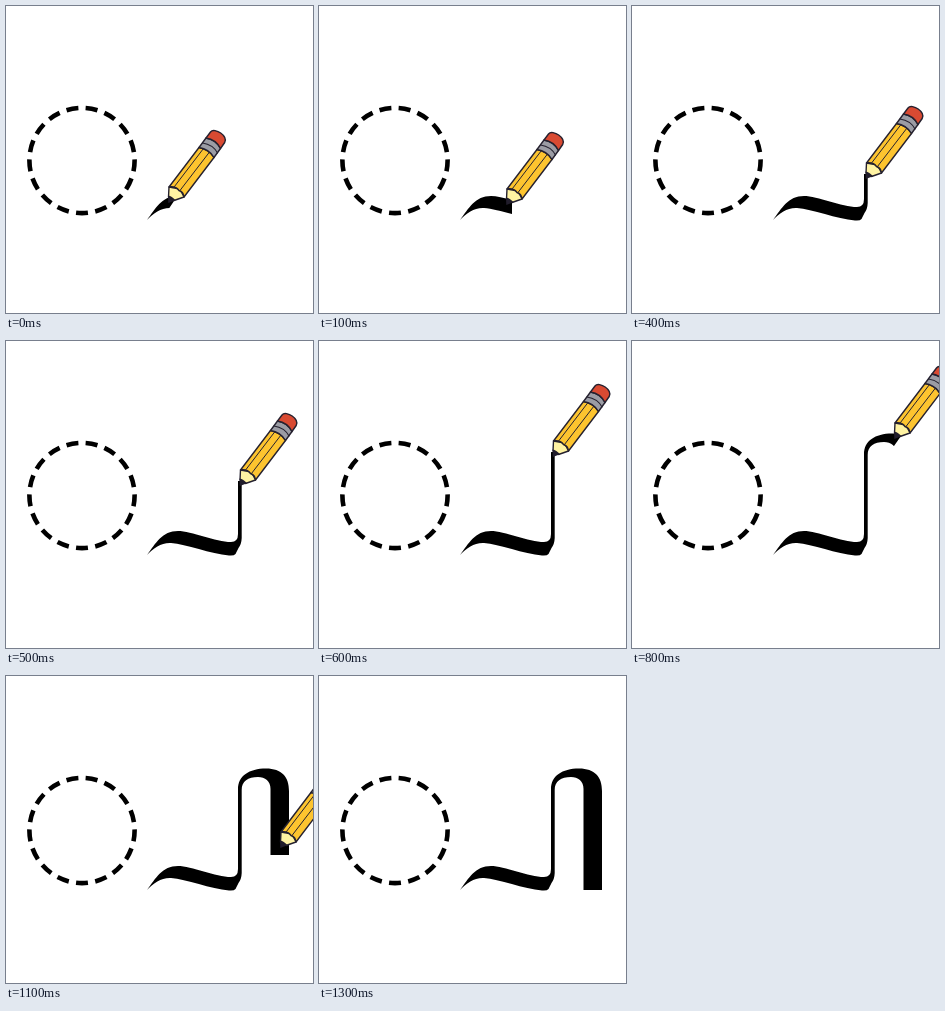
Animation, 307 px wide and 307 px high, one loop 3300 ms. Source, as an HTML page:

```html
<!DOCTYPE html>
<html lang="en">
<head>
<meta charset="utf-8">
<title>Writing a letter</title>
<style>
  html, body { margin: 0; width: 100%; height: 100%; overflow: hidden; background: #fff; }
  svg { display: block; width: 100vw; height: 100vh; }
  .pencil { stroke: #25212f; stroke-width: 1.4; stroke-linejoin: round; stroke-linecap: round; }
</style>
</head>
<body>
<svg viewBox="0 0 307 307">
  <clipPath id="drawn"><path id="reveal"/></clipPath>

  <circle cx="76" cy="154.5" r="52.6" fill="none" stroke="#000" stroke-width="4.6"
    pathLength="17" stroke-dasharray=".62 .38" stroke-dashoffset="-.19" transform="rotate(-90 76 154.5)"/>

  <path clip-path="url(#drawn)" d="M141 214C150 202 156 190 172 190C185 190 210 201 225 201Q232 201 232 193
    V113C232 100 243 92.5 260 92.5C276 92.5 283 101 283 115V214H264.5V113C264.5 105 259 101 252 101
    C242 101 235.700 105 235.700 114V197Q235.500 203 232.500 207L229.500 213Q228 215 223 214.500
    C205 213 180 203 165 202C155 201.500 148 207 141 214Z"/>

  <g id="pencil" class="pencil">
    <path fill="#fff3a3" d="M163 181L162.500 191L168 194.500L178 191L174 183Z"/>
    <path fill="#211d2b" stroke="none" d="M162 189.500Q166 190 169.500 194.300L162.300 197Z"/>
    <path fill="#fdc42f" d="M163 181L193 141.500Q203 143 208 151.500L178 191Q177.500 186 173 184.500Q170 180 163 181Z"/>
    <path fill="none" stroke-width="1" d="M168.500 180.500L197.500 142.500M174 184.500L203.500 146"/>
    <path fill="#9b9ca4" d="M193 141.500L200 132Q210 133.500 214.500 142.500L208 151.500Q203 143 193 141.500Z"/>
    <path fill="none" stroke-width="1.100" d="M196.500 137Q207 138.500 211.500 147"/>
    <path fill="#d94a32" d="M200 132L204.500 126Q206 124 209 124.600Q215.500 126 218.700 131.300Q220 133.700 218.700 136.500L214.500 142.500Q210 133.500 200 132Z"/>
  </g>
</svg>
<script>
const LOOP = 3300, STEP = 100;
const pencil = document.getElementById('pencil');
const reveal = document.getElementById('reveal');

// Visible ink areas for the four parts of the stroke
const tail = x => `M0 180H${x}V220H0Z`;
const stem = y => `M0 ${y}H240V220H0Z`;
const arch = (top, bottom) => `M0 80H${top}V95L${bottom} 105H240V220H0Z`;
const leg = y => `M0 80H300V${y}H240V220H0Z`;

// Pencil offset and visible ink at each step
const poses = [
  [0, 0, 'M0 180H170V192L162 204V220H0Z'],
  [25, 2, tail(193)],
  [49, 9, tail(217)],
  [70, 5, stem(197)],
  [71.5, -24, stem(168)],
  [71.5, -52, stem(140)],
  [71.5, -81, stem(111)],
  [82, -96, arch(249, 245)],
  [100, -99, arch(269, 262)],
  [112, -85, leg(119)],
  [112, -56, leg(147)],
  [112, -25, leg(179)],
  [111, 8, leg(220)],
];

function draw(now) {
  const step = Math.floor(now % LOOP / STEP);
  const writing = step < poses.length;
  const [x, y, ink] = poses[Math.min(step, poses.length - 1)];
  pencil.setAttribute('transform', `translate(${x} ${y})`);
  pencil.setAttribute('visibility', writing ? 'visible' : 'hidden');
  reveal.setAttribute('d', ink);
}

const start = performance.now();
function tick() {
  draw(performance.now() - start);
  requestAnimationFrame(tick);
}
tick();
</script>
</body>
</html>
```
